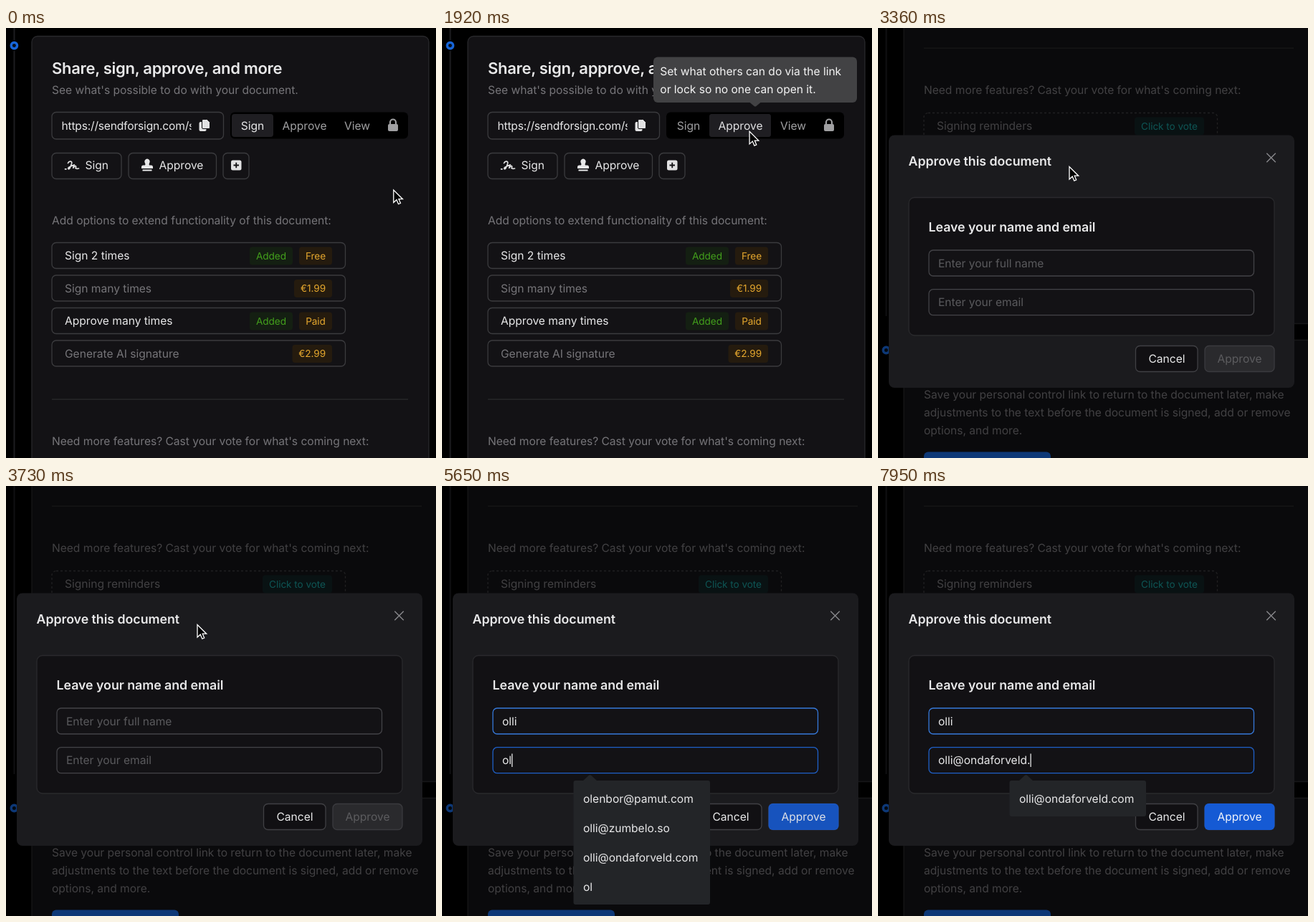
Animation of 600 by 600 pixels, one loop 8000 ms. Source, as an HTML page:

```html
<!DOCTYPE html>
<html lang="en">
<head>
<meta charset="utf-8">
<title>Share and approve</title>
<style>
  html, body { margin: 0; width: 100%; height: 100%; overflow: hidden; background: #000; }
  svg { display: block; width: 600px; height: 600px; }
  text {
    font: 400 15.6px Inter, "Open Sans", sans-serif; letter-spacing: -.02px;
    fill: #e8e8e9; text-rendering: geometricPrecision; white-space: pre;
  }
  .dim { fill: #767579; }
  .hint { fill: #5a5a5d; }
  .mid { text-anchor: middle; }
  .url { letter-spacing: -.2px; }
  .tag { font-size: 13.6px; letter-spacing: -.05px; text-anchor: middle; }
  .h1 { font-size: 22px; font-weight: 600; letter-spacing: -.28px; }
  .h2 { font-size: 17.8px; font-weight: 600; letter-spacing: -.04px; }
  .tip text { fill: #f4f4f4; }
</style>
</head>
<body>
<svg id="stage" viewBox="0 0 600 600"></svg>
<script>
const LOOP = 8000, SCROLL = 490, CARD = '#131215', LINE = '#3b3b3e';
const NAMES = ['4444', 'joren', 'olli', 'Tovi Barn', '123', 'Nela'];
const EMAILS = ['olenbor@pamut.com', 'olli@zumbelo.so', 'olli@ondaforveld.com', 'ol'];
const NAME = 'olli', EMAIL = 'olli@ondaforveld.';
const NAME_KEYS = [4720, 4840, 4950, 5060];
const EMAIL_KEYS = [5460, 5600, 5760, 5880, 6060, 6180, 6420, 6500, 6600,
  6690, 6780, 6870, 6960, 7040, 7130, 7280, 7480];
const NAME_FOCUS = 4220, EMAIL_FOCUS = 5320, OPEN = 2770;

const box = (x, y, w, h, fill, line = 'none', r = 6, more = '') =>
  `<rect x="${x}" y="${y}" width="${w}" height="${h}" rx="${r}" fill="${fill}" stroke="${line}" stroke-width="1.3" ${more}/>`;
const txt = (x, y, s, cls = '', more = '') =>
  `<text x="${x}" y="${y}" class="${cls}" ${more}>${s}</text>`;
const tag = (x, y, w, s, bg, fg) =>
  box(x, y, w, 25, bg, 'none', 4) + txt(x + w / 2, y + 17.2, s, 'tag', `style="fill:${fg}"`);

const green = (y) => tag(340, y, 60, 'Added', '#141f12', '#43a01c');
const gold = (x, y, s) => tag(x, y, 455 - x, s, '#251b0e', '#e6a82e');

function option(i, label, price, x, added) {
  const y = 299.5 + i * 45.5;
  return box(64, y, 409.5, 36, CARD, LINE) +
    txt(82, y + 23.6, label, added ? '' : 'dim') +
    (added ? green(y + 6) : '') + gold(x, y + 6, price);
}

function tooltip(id, x, y, h, tipX, lines) {
  return `<g id="${id}" class="tip">` + box(x, y, 284, h, '#424244') +
    `<path d="M${tipX - 8} ${y + h - .5}h16l-6.5 5.6q-1.5 1-3 0z" fill="#424244"/>` +
    lines.map((s, i) => txt(x + 9.3, y + 25 + i * 25, s)).join('') + '</g>';
}

const dot = (y) => `<circle cx="11.4" cy="${y}" r="4.2" fill="#06101f" stroke="#1765d8" stroke-width="3.4"/>`;

const page = `<g id="page">
  <path d="M11.5 -20V17M11.5 32V892" stroke="#1d1d20" stroke-width="2"/>
  ${dot(24.5)}${dot(939.5)}
  ${box(36, 11.5, 554, 891, CARD, '#29292c', 8, 'class="card"')}
  ${box(36, 925.5, 554, 300, CARD, '#29292c', 8, 'class="card"')}
  ${txt(64, 64, 'Share, sign, approve, and more', 'h1')}
  ${txt(64, 91.8, "See what's possible to do with your document.", 'dim')}
  ${box(64, 117.5, 239.5, 37.5, CARD, LINE)}
  <clipPath id="url"><rect x="70" y="118" width="188.5" height="36"/></clipPath>
  <g clip-path="url(#url)">${txt(77.5, 141.7, 'https://sendforsign.com/s', 'url')}</g>
  <g fill="#e2e2e3"><rect x="269.500" y="131" width="10" height="13" rx="2"/>
    <path d="M275 127.500h5.500l4 4v7.500q0 1.500-1.500 1.500h-8q-1.500 0-1.500-1.500v-10q0-1.500 1.500-1.500z" stroke="${CARD}"/></g>
  ${box(313, 117.5, 248, 37, '#000')}
  ${box(373, 120, 86, 32, '#1f1e22', 'none', 4, 'id="hover"')}
  ${box(315, 120, 58, 32, '#1f1e22', 'none', 4, 'id="thumb"')}
  ${txt(344, 141.7, 'Sign', 'mid', 'id="segSign"')}
  ${txt(416.5, 141.7, 'Approve', 'mid', 'id="segApprove"')}
  ${txt(490, 141.7, 'View', 'mid', 'style="fill:#a0a0a2"')}
  <rect x="533" y="134" width="14" height="10" rx="2" fill="#a0a0a2"/>
  <path d="M536 135v-3.500a4 4 0 0 1 8 0V135" fill="none" stroke="#a0a0a2" stroke-width="2.200"/>
  ${box(64, 174.5, 97, 36, CARD, LINE)}
  <path d="M82.500 196.800h1.500M86.500 188.500q1-2.500 3.500-2.300t1.500 3.300l-2.200 5.500q-1.300 2.500-2.300 1.500t1.500-2.500q4-2.300 6.500-2.800l-1.500 4.500q2.800-4 3.800-3t-.3 3q1.200 1 4.500.3" fill="none" stroke="#e2e2e3" stroke-width="1.700" stroke-linecap="round"/>
  ${txt(110.5, 197.2, 'Sign')}
  ${box(171, 174.5, 122.5, 36, CARD, LINE, 6, 'id="btn"')}
  <g id="btnInk"><path d="M193.500 187.500a3.700 3.700 0 1 1 7 0q-1.500 2.500-.5 4h2.500q2.500 0 2.500 2.500v2h-16v-2q0-2.500 2.500-2.500h2.500q1-1.500-.5-4zM190.500 197.500h13v2h-13z"/>
  ${txt(213.5, 197.2, 'Approve', '', 'style="fill:inherit"')}</g>
  ${box(303, 174.5, 36, 36, CARD, LINE)}
  <rect x="314" y="184.500" width="14.500" height="14" rx="2.500" fill="#e2e2e3"/>
  <path d="M321.250 187.800v7.400M317.500 191.500h7.500" stroke="${CARD}" stroke-width="1.800"/>
  ${txt(64, 273.7, 'Add options to extend functionality of this document:', 'dim')}
  ${option(0, 'Sign 2 times', 'Free', 409, true)}
  ${option(1, 'Sign many times', '€1.99', 402, false)}
  ${option(2, 'Approve many times', 'Paid', 409, true)}
  ${option(3, 'Generate AI signature', '€2.99', 399.5, false)}
  <path id="rule" stroke="#2a2a2d" stroke-width="1.300"/>
  ${txt(64, 582.4, "Need more features? Cast your vote for what's coming next:", 'dim')}
  ${box(64, 608.5, 409.5, 36, 'none', LINE, 6, 'stroke-dasharray="3 3"')}
  ${txt(82, 631.7, 'Signing reminders', 'dim')}
  ${tag(358, 614.5, 97, 'Click to vote', '#112023', '#189a98')}
  ${['Save your personal control link to return to the document later, make',
    'adjustments to the text before the document is signed, add or remove',
    'options, and more.'].map((s, i) => txt(64, 1006.5 + i * 25, s, 'dim')).join('')}
  ${box(64, 1081.5, 177, 37, '#1765d8')}
  ${tooltip('tipLink', 295, 40.5, 63.5, 437, ['Set what others can do via the link', 'or lock so no one can open it.'])}
  ${tooltip('tipApprove', 90, 96.5, 63.5, 232, ['Approve the document from your', 'side.'])}
</g>`;

const field = (id, y, hint) => box(71, y, 453.5, 36, '#131215', '#434347', 6, `id="${id}Box"`) +
  txt(84, y + 23.6, hint, 'hint', `id="${id}Hint"`) + txt(84, y + 23.6, '', '', `id="${id}"`);

const modal = `<rect id="mask" width="600" height="600"/>
<g id="modal">
  ${box(15, 149.5, 566, 352.5, '#1b1b1e', 'none', 8)}
  ${txt(42.5, 192, 'Approve this document', 'h2')}
  <path d="M542.300 174.800l12.500 12.500m0-12.500l-12.500 12.500" stroke="#88888b" stroke-width="1.400"/>
  ${box(43, 236.5, 510, 192.5, '#121114', '#2a2a2d', 8)}
  ${txt(70.5, 284.3, 'Leave your name and email', 'h2')}
  ${field('name', 310, 'Enter your full name')}
  ${field('email', 364.7, 'Enter your email')}
  <path id="caret" stroke="#e8e8e8" stroke-width="1.300"/>
  ${box(359.5, 443.5, 86.5, 36, '#111013', '#404044')}
  ${txt(403, 467, 'Cancel', 'mid')}
  ${box(456, 443.5, 97, 36, '#2a2a2d', '#3b3b3f')}
  ${txt(504.5, 467, 'Approve', 'mid', 'style="fill:#5c5c5f"')}
  <g id="submit">${box(455.5, 443, 98, 37, '#155ad4')}${txt(504.5, 467, 'Approve', 'mid', 'style="fill:#f2f5fb"')}</g>
</g>
<g id="list"></g>`;

const cursors = `
<path id="arrow" d="M0 0V17.500L4.200 13.700L6.800 19.700L9.700 18.500L7.200 12.700H12.700Z" fill="#000" stroke="#fff" stroke-width="1.300"/>
<path id="hand" d="M3.500 9.500V2.200q1.200-1.800 2.600 0V7q1.300-1 2.500.2q1.400-.8 2.400.5q1.700-.6 2.300 1V13q-.3 2.500-1.800 5H5.300Q3.500 14.500.5 11.600Q.3 9.300 3.500 9.500z" fill="#fff" stroke="#111" stroke-width="1"/>
<g id="beam" fill="none"><path d="M-4.500 -9.500q4.500 0 4.500 2.500v14q0 2.500-4.500 2.500M4.500 -9.500q-4.500 0-4.500 2.500v14q0 2.500 4.500 2.500M-2.500 3h5" stroke="#fff" stroke-width="3"/>
<path d="M-4.500 -9.500q4.500 0 4.500 2.500v14q0 2.500-4.500 2.500M4.500 -9.500q-4.500 0-4.500 2.500v14q0 2.500 4.500 2.500M-2.500 3h5" stroke="#000" stroke-width="1.100"/></g>`;

const stage = document.getElementById('stage');
stage.innerHTML = page + modal + cursors;
const el = (id) => document.getElementById(id);
const set = (id, attrs) => { for (const k in attrs) el(id).setAttribute(k, attrs[k]); };
const show = (id, on) => set(id, { opacity: +on });

const ramp = (t, a, b) => Math.min(1, Math.max(0, (t - a) / (b - a)));
const smooth = (u) => u * u * (3 - 2 * u);
const pulse = (t, a, b, c, d) => ramp(t, a, b) * (1 - ramp(t, c, d));

// time span, then the point reached at its end
const MOVES = [[430, 860, 432, 143.5], [1880, 2400, 267, 193.5], [3770, 4160, 256.5, 321]];

function pointer(t) {
  let p = [540.8, 226];
  for (const [a, b, x, y] of MOVES) {
    const u = smooth(ramp(t, a, b));
    p = [p[0] + (x - p[0]) * u, p[1] + (y - p[1]) * u];
  }
  return p;
}

const typed = (keys, word, t) => word.slice(0, keys.filter((k) => k <= t).length);

let listKey = '';
function drawList(items, top, w) {
  const key = items.join() + top;
  if (key === listKey) return;
  listKey = key;
  el('list').innerHTML = items.length ? `<path d="M196 ${top + 1}l8.500-8q2-1.500 4 0l8.500 8z" fill="#232528"/>` +
    box(183.5, top, w, 50 + 41 * (items.length - 1), '#232528', 'none', 3) +
    items.map((s, i) => txt(197, top + 31 + 41 * i, s)).join('') : '';
}

function render(t) {
  const [x, y] = pointer(t), open = t >= OPEN;

  // page
  set('page', { transform: `translate(0 ${open ? -SCROLL : 0})` });
  set('rule', { d: `M64 518.2H${open ? 580 : 561}` });
  document.querySelectorAll('.card').forEach((c) => c.setAttribute('width', open ? 573 : 554));
  const slide = smooth(ramp(t, 1290, 1560));
  set('thumb', { x: 315 + 58 * slide, width: 58 + 28 * slide });
  const overSeg = t > 790 && t < 1960;
  show('hover', overSeg);
  el('segSign').style.fill = t < 1330 ? '#e8e8e9' : '#a0a0a2';
  el('segApprove').style.fill = overSeg || t > 1290 ? '#e0e0e2' : '#a0a0a2';
  const overBtn = t > 2260 && !open;
  set('btn', { stroke: overBtn ? '#3478dc' : LINE });
  set('btnInk', { fill: overBtn ? '#3c82e6' : '#e8e8e9' });
  show('tipLink', pulse(t, 830, 960, 1980, 2100));
  show('tipApprove', pulse(t, 2340, 2470, 2720, OPEN));

  // dialog
  const u = ramp(t, OPEN, OPEN + 280), grow = 1 - (1 - u) ** 3, k = .2 + .8 * grow;
  set('mask', { 'fill-opacity': .45 * u });
  set('modal', { opacity: grow, transform: `translate(270 200) scale(${k}) translate(-270 -200)` });

  // form
  const name = typed(NAME_KEYS, NAME, t), email = typed(EMAIL_KEYS, EMAIL, t);
  const inEmail = t >= EMAIL_FOCUS, focused = t >= NAME_FOCUS;
  el('name').textContent = name;
  el('email').textContent = email;
  show('nameHint', !name);
  show('emailHint', !email);
  const overName = y > 308 && t > 3770;
  set('nameBox', { stroke: focused && !inEmail ? '#1b62cf' : overName ? '#3679da' : '#434347' });
  set('emailBox', { stroke: inEmail ? '#1f60c8' : '#434347' });
  show('submit', ramp(t, EMAIL_KEYS[0], EMAIL_KEYS[0] + 220));
  const last = Math.max(...[NAME_FOCUS, EMAIL_FOCUS, ...NAME_KEYS, ...EMAIL_KEYS].filter((v) => v <= t));
  const word = el(inEmail ? 'email' : 'name');
  const cx = 84.7 + (word.textContent ? word.getComputedTextLength() : 0);
  set('caret', { d: `M${cx} ${inEmail ? 373.5 : 319}v18.500` });
  show('caret', focused && (t - last) % 1060 < 530);

  // suggestions
  if (email) drawList(EMAILS.filter((s) => s.startsWith(email)), 411, 190.5);
  else if (t >= 4300 && !inEmail) drawList(NAMES.filter((s) => s.startsWith(name)), 356.5, 177.5);
  else drawList([], 0, 0);

  // pointer
  const kind = name ? '' : overName ? 'beam' : overBtn ? 'hand' : 'arrow';
  for (const id of ['arrow', 'hand', 'beam']) {
    show(id, id === kind);
    set(id, { transform: `translate(${x} ${y})` });
  }
}

const start = performance.now();
function tick() {
  render((performance.now() - start) % LOOP);
  requestAnimationFrame(tick);
}
tick();
</script>
</body>
</html>
```
